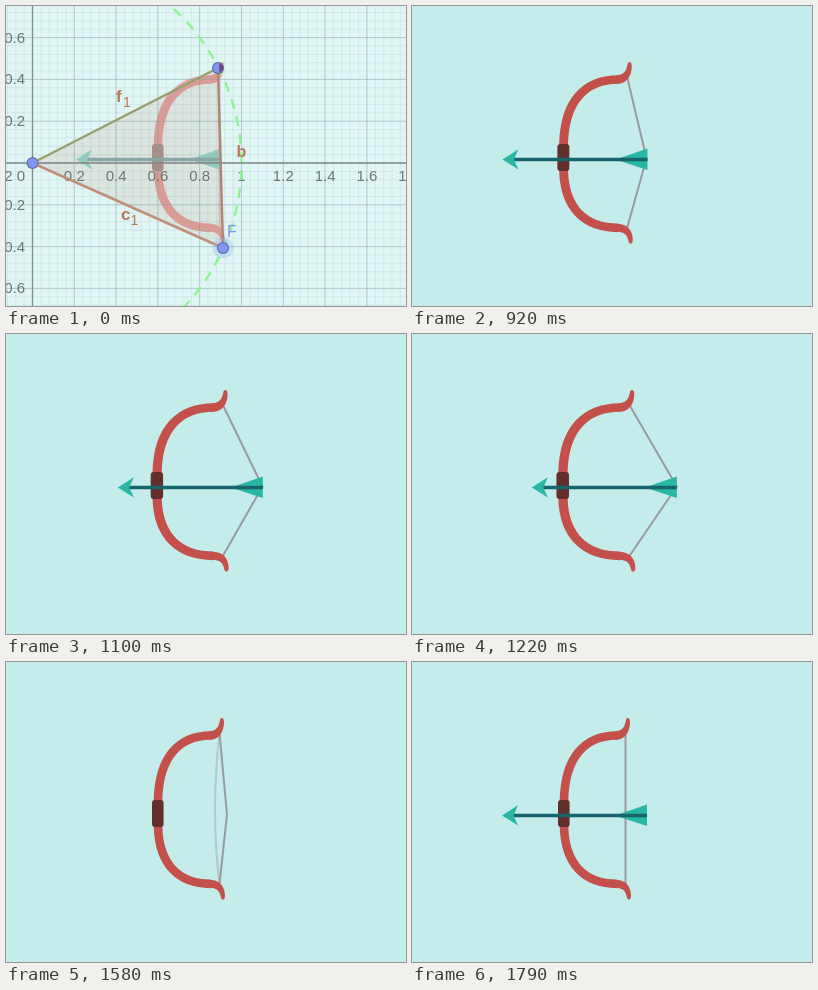
Recreate the animation shown at these times as an HTML page with a canvas. Size 400x300 px, loop 1.82 s.

```html
<!DOCTYPE html>
<html lang="en">
<head>
<meta charset="utf-8">
<title>Bow and arrow</title>
<style>
  html, body { margin: 0; width: 100%; height: 100%; overflow: hidden; background: #c4ecea; }
  canvas { display: block; width: 400px; height: 300px; }
</style>
</head>
<body>
<canvas id="stage" width="400" height="300"></canvas>
<script>
const ctx = document.getElementById('stage').getContext('2d');
const LOOP = 1820, STEP = 30;
const PULL_START = 800, PULL_TIME = 555, PULL = 53;
const PAUSE = 1280, RELEASE = 1520;
const AXIS = 153.5, STRING_X = 213.5, NOCK = 215;
const SANS = '"Liberation Sans", Arial, sans-serif';

function polyline(points, close) {
  ctx.beginPath();
  points.forEach(([x, y]) => ctx.lineTo(x, y));
  if (close) ctx.closePath();
}

function fillShape(points, color) {
  polyline(points, true);
  ctx.fillStyle = color;
  ctx.fill();
}

function strokeLine(points, color, width) {
  polyline(points);
  ctx.strokeStyle = color;
  ctx.lineWidth = width;
  ctx.stroke();
}

function disc(x, y, r, color) {
  ctx.beginPath();
  ctx.arc(x, y, r, 0, Math.PI * 2);
  ctx.fillStyle = color;
  ctx.fill();
}

function text(str, x, y, font, color, align = 'left') {
  ctx.font = `${font} ${SANS}`;
  ctx.fillStyle = color;
  ctx.textAlign = align;
  ctx.fillText(str, x, y);
}

// One limb, drawn upwards from the grip; flip = -0.89 gives the lower one.
function limb(flip) {
  const red = '#c4504b';
  ctx.save();
  ctx.translate(0, 152);
  ctx.scale(1, flip);
  ctx.beginPath();
  ctx.moveTo(152, 0);
  ctx.lineTo(152, -14);
  ctx.bezierCurveTo(153, -56, 172, -78.5, 205, -78.5);
  ctx.restore();
  ctx.strokeStyle = red;
  ctx.lineWidth = 8.6;
  ctx.stroke();

  ctx.save();
  ctx.translate(flip < 0 ? 1 : 0, 152);
  ctx.scale(1, flip);
  ctx.beginPath();
  ctx.moveTo(203, -82.8);
  ctx.bezierCurveTo(211, -83, 213, -88, 214, -94);
  ctx.bezierCurveTo(214.5, -97, 218, -97, 218, -92);
  ctx.bezierCurveTo(218, -81, 212, -73.5, 203, -74.2);
  ctx.closePath();
  ctx.fillStyle = red;
  ctx.fill();
  ctx.restore();
}

function bow(stretch) {
  ctx.save();
  ctx.translate(165, 0);
  ctx.scale(stretch, 1);
  ctx.translate(-165, 0);
  limb(1);
  limb(-0.89);
  ctx.beginPath();
  ctx.roundRect(146, 138, 11.6, 27, 3);
  ctx.fillStyle = '#622f2b';
  ctx.fill();
  ctx.restore();
}

function bowString(endX, midX, ghost) {
  if (ghost) {
    ctx.beginPath();
    ctx.moveTo(endX, 72);
    ctx.quadraticCurveTo(endX + 2 * ghost, 148, endX, 222);
    ctx.strokeStyle = 'rgba(150,150,155,.4)';
    ctx.lineWidth = 2;
    ctx.stroke();
  }
  strokeLine([[endX, 71], [midX, AXIS - 1], [endX, 222]], '#999a9f', 2);
}

function arrow(shift) {
  const teal = '#2ab7a1';
  const tip = 70 + shift, end = NOCK + shift;
  fillShape([[end - 32, AXIS], [end, 142.5], [end, 164]], teal);
  strokeLine([[tip + 10, AXIS], [end, AXIS]], '#16646c', 3.6);
  fillShape([[tip, AXIS], [tip + 16, 143.3], [tip + 11.5, AXIS], [tip + 16, 163.5]], teal);
}

// Pose of arrow, bow and string at a time in the loop.
function poseAt(time) {
  const rest = { shift: 0, stretch: 1, mid: STRING_X, ghost: 0 };
  if (time < PULL_START) return rest;
  if (time < RELEASE) {
    const step = time < PAUSE ? STEP : 2 * STEP;
    const elapsed = Math.floor((time - PULL_START) / step) * step;
    const left = 1 - Math.min(1, elapsed / PULL_TIME);
    const drawn = 1 - left * left;
    return {
      shift: PULL * drawn,
      stretch: 1 + 0.087 * drawn,
      mid: STRING_X + (NOCK + PULL - STRING_X) * drawn,
      ghost: 0
    };
  }
  const k = Math.floor((time - RELEASE) / STEP);
  const remaining = 10 - k;
  const swing = 9.6 * (1 - k / 9) * (k % 2 ? -1 : 1);
  return {
    shift: k < 3 ? 8 - 118 * k : 20 * remaining * remaining,
    stretch: 1,
    mid: STRING_X + swing,
    ghost: k ? -0.6 * swing : 0
  };
}

function scene({ shift, stretch, mid, ghost }) {
  ctx.fillStyle = '#c4ecea';
  ctx.fillRect(0, 0, 400, 300);
  bowString(165 + (STRING_X - 165) * stretch, mid, ghost);
  bow(stretch);
  arrow(shift);
}

function gridLines(spacing, color) {
  const ox = 26.5, oy = 157;
  for (let x = ox % spacing; x < 400; x += spacing) strokeLine([[x, 0], [x, 300]], color, 1);
  for (let y = oy % spacing; y < 300; y += spacing) strokeLine([[0, y], [400, y]], color, 1);
}

function indexed(letter, x, y, subX) {
  text(letter, x, y, 'bold 17px', '#b9785c');
  text('1', subX, y + 4.5, '14px', '#b9785c');
}

// Construction sketch laid over the faded bow.
function construction() {
  const ox = 26.5, oy = 157, unit = 209, tick = unit / 5;
  const top = [212, 62], low = [217, 242], origin = [ox, oy];
  ctx.fillStyle = 'rgba(255,255,255,.48)';
  ctx.fillRect(0, 0, 400, 300);
  gridLines(tick / 5, 'rgba(150,190,195,.22)');
  gridLines(tick, 'rgba(120,155,160,.38)');
  strokeLine([[0, oy], [400, oy]], '#7f8d8d', 1.3);
  strokeLine([[ox, 0], [ox, 300]], '#7f8d8d', 1.3);

  const grey = '#6d7676';
  for (let i = 1; i < 10; i++) {
    text(String(i * 2 / 10), ox + i * tick, 175, '15px', grey, 'center');
  }
  text('-0.2', 6.5, 175, '15px', grey, 'right');
  text('0', 19, 175, '15px', grey, 'right');
  for (let i = 1; i < 4; i++) {
    const label = (i * 2 / 10).toFixed(1);
    text(label, 19, oy - i * tick + 5, '15px', grey, 'right');
    text('-' + label, 19, oy + i * tick + 5, '15px', grey, 'right');
  }

  ctx.setLineDash([10, 8]);
  ctx.beginPath();
  ctx.arc(ox, oy, unit, -1, 1);
  ctx.strokeStyle = '#8cf58e';
  ctx.lineWidth = 2.3;
  ctx.stroke();
  ctx.setLineDash([]);

  fillShape([origin, top, low], 'rgba(165,90,60,.11)');
  strokeLine([origin, top], '#97a06c', 2.5);
  strokeLine([origin, low], '#c18f79', 2.5);
  strokeLine([top, low], '#b38370', 2.5);

  disc(...low, 10.5, 'rgba(150,180,240,.35)');
  for (const [x, y] of [origin, top, low]) {
    disc(x, y, 6, '#5c6799');
    disc(x, y, 5, '#8294f2');
  }
  ctx.beginPath();
  ctx.arc(...top, 5, -1.3, 1.3);
  ctx.fillStyle = '#70457f';
  ctx.fill();

  indexed('f', 110, 96, 117);
  indexed('c', 115, 214, 124.5);
  text('b', 230.5, 151, 'bold 16px', '#b9785c');
  text('F', 221, 231, '16px', '#8496ee');
}

function frame() {
  const time = performance.now() % LOOP;
  scene(poseAt(time));
  if (time < PULL_START) construction();
  requestAnimationFrame(frame);
}
frame();
</script>
</body>
</html>
```
